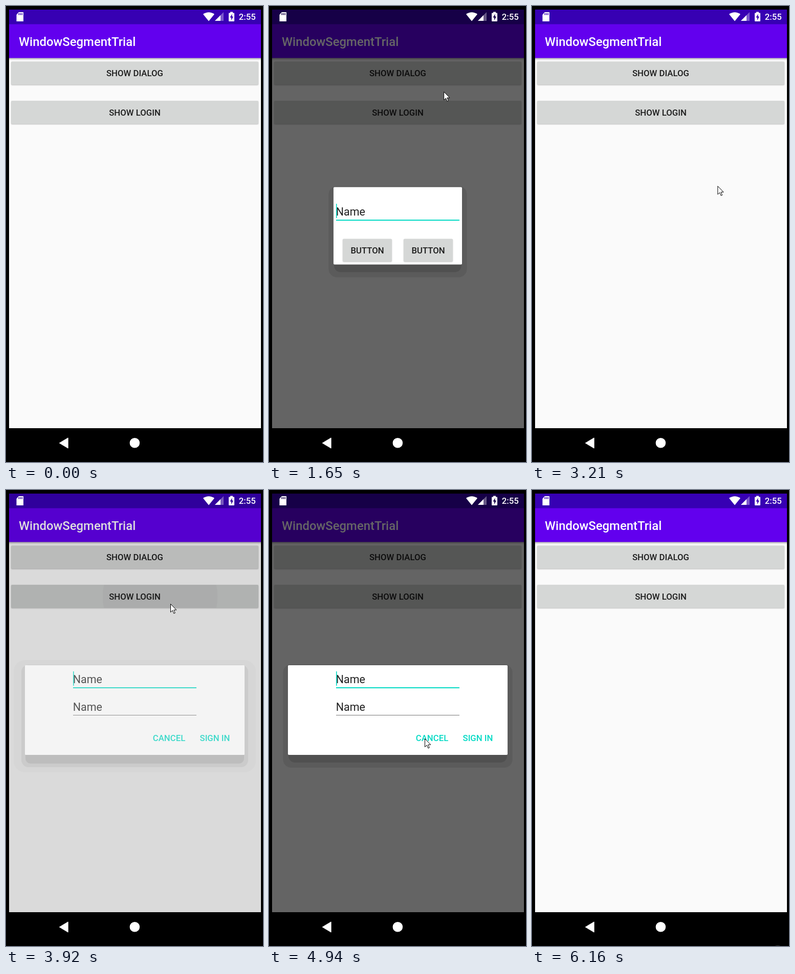
These frames come from a looping animation (502x890 px, 6.25 s). An HTML page with a canvas:

```html
<!DOCTYPE html>
<html lang="en">
<head>
<meta charset="utf-8">
<title>Dialog demo</title>
<style>
html, body { margin: 0; width: 100%; height: 100%; overflow: hidden; background: #000; }
canvas { display: block; }
</style>
</head>
<body>
<canvas id="stage" width="502" height="890"></canvas>
<script>
const LOOP = 6250, STEP = 78, PHASE = 12;
const TEAL = '#03dac5', INK = '#1c1c1c';
const stage = document.getElementById('stage').getContext('2d');
const layer = document.createElement('canvas').getContext('2d');
layer.canvas.width = 502;
layer.canvas.height = 890;

const dialogs = [
  { x: 126, y: 353.5, w: 251, h: 151, open: 1448, close: 2853, draw: drawNameDialog },
  { x: 37, y: 342, w: 429, h: 175, open: 3797, close: 5043, draw: drawLoginDialog }
];

// Each move is a curve: it bends towards (cx, cy) and stops at (x, y).
const START = { x: 414, y: 309 };
const MOVES = [
  { from: 550, to: 940, cx: 345, cy: 175, x: 303, y: 132 },
  { from: 1570, to: 1890, cx: 418, cy: 169, x: 223, y: 470 },
  { from: 1960, to: 2130, cx: 214, cy: 472, x: 206, y: 468 },
  { from: 2680, to: 3290, cx: 511, cy: 770, x: 321, y: 222 },
  { from: 3990, to: 4470, cx: 325, cy: 350, x: 304, y: 485 },
  { from: 5390, to: 5860, cx: 330, cy: 600, x: 450, y: 895 }
];

// Start time and centre of each click mark.
const CLICKS = [
  [70, 514.5, 859], [1170, 303, 132], [2520, 206, 468],
  [3610, 321, 222], [5020, 304, 485], [6090, 480, 904]
];

const clamp = v => Math.min(1, Math.max(0, v));
const within = (t, start, length) => t >= start && t < start + length;

function dialogAlpha(d, t) {
  return clamp((t - d.open) / 160) * clamp(1 - (t - d.close) / 155);
}

function dialogDim(d, t) {
  const rise = clamp((t - d.open - 50) / 140) ** 2;
  return .6 * rise * clamp(1 - (t - d.close - 60) / 200);
}

function cursorAt(t) {
  let p = START;
  for (const m of MOVES) {
    const u = clamp((t - m.from) / (m.to - m.from)), v = 1 - u;
    p = {
      x: v * v * p.x + 2 * u * v * m.cx + u * u * m.x,
      y: v * v * p.y + 2 * u * v * m.cy + u * u * m.y
    };
    if (u < 1) break;
  }
  return p;
}

function rect(c, color, x, y, w, h, r = 0) {
  c.fillStyle = color;
  c.beginPath();
  c.roundRect(x, y, w, h, r);
  c.fill();
}

function poly(c, color, points) {
  c.fillStyle = color;
  c.beginPath();
  points.forEach(([x, y]) => c.lineTo(x, y));
  c.closePath();
  c.fill();
}

function disc(c, color, x, y, r) {
  c.fillStyle = color;
  c.beginPath();
  c.arc(x, y, r, 0, Math.PI * 2);
  c.fill();
}

function text(c, str, x, y, size, color, weight = 500, align = 'left') {
  c.font = `${weight} ${size}px Roboto, sans-serif`;
  c.textAlign = align;
  c.fillStyle = color;
  c.fillText(str, x, y);
}

const label = (c, str, x, y, color) => text(c, str, x, y, 16.76, color, 500, 'center');

function button(c, str, x, y, w, h, decorate) {
  c.save();
  c.shadowColor = 'rgba(0,0,0,.25)';
  c.shadowBlur = 2;
  c.shadowOffsetY = 1;
  rect(c, '#d5d7d6', x, y, w, h, 2);
  c.restore();
  if (decorate) {
    c.save();
    c.clip();
    decorate();
    c.restore();
  }
  label(c, str, x + w / 2, y + h / 2 + 6.2, INK);
}

function wideButton(c, str, y, t, pressed, touchX) {
  const age = t - pressed;
  button(c, str, 10, y, 483, 45, within(t, pressed, 300) && (() => {
    rect(c, 'rgba(0,0,0,.05)', 10, y, 483, 45);
    disc(c, 'rgba(0,0,0,.03)', touchX - age * .09, y + 23, 30 + age * .37);
  }));
}

function drawApp(c, t) {
  rect(c, '#000', 0, 0, 502, 890);
  rect(c, '#fafafa', 6, 7, 492, 817);
  const shade = c.createLinearGradient(0, 101, 0, 106);
  shade.addColorStop(0, 'rgba(0,0,0,.32)');
  shade.addColorStop(1, 'rgba(0,0,0,0)');
  rect(c, shade, 6, 101, 492, 5);
  rect(c, '#6200ee', 6, 35, 492, 66.5);
  rect(c, '#3700b3', 6, 7, 492, 28.5);
  text(c, 'WindowSegmentTrial', 25, 78, 23.9, '#fff');
  wideButton(c, 'SHOW DIALOG', 108.5, t, 1330, 303);
  wideButton(c, 'SHOW LOGIN', 185, t, 3690, 321);
}

function drawStatus(c, dim) {
  const bar = `rgb(${55 * (1 - dim)},0,${179 * (1 - dim)})`;
  poly(c, '#fff', [[25, 12], [34, 12], [34, 30], [20.5, 30], [20.5, 17]]);
  for (let i = 0; i < 3; i++) rect(c, bar, 24.5 + i * 3, 14, 1.6, 3.5);

  c.fillStyle = '#fff';
  c.beginPath();
  c.moveTo(396, 29.5);
  c.lineTo(385, 16);
  c.quadraticCurveTo(396, 8.5, 407, 16);
  c.fill();

  poly(c, 'rgba(255,255,255,.35)', [[408, 29], [425, 12], [425, 29]]);
  poly(c, '#fff', [[408, 29], [419, 18], [419, 29]]);

  rect(c, '#fff', 435, 13.5, 11, 16.5, 1);
  rect(c, '#fff', 438, 11.5, 5, 3);
  poly(c, bar, [[441.5, 15.5], [437.5, 22.5], [440, 22.5], [440, 28], [444, 20.5], [441.5, 20.5]]);
  text(c, '2:55', 454.8, 27.2, 16.76, '#fff');
}

function drawNav(c) {
  poly(c, '#fff', [[103.5, 853], [121, 842.5], [121.7, 843], [121.7, 863], [121, 863.5]]);
  disc(c, '#fff', 251.4, 852.8, 9.8);
}

function field(c, base, active, caret) {
  text(c, 'Name', 130.7, base, 21.5, '#212121', 400);
  rect(c, active ? TEAL : '#777', 131, base + 8, 241, active ? 2 : 1);
  if (caret) rect(c, TEAL, 131, base - 23, 1.6, 28);
}

function drawNameDialog(c, caret) {
  field(c, 409, true, caret);
  button(c, 'BUTTON', 144, 454.5, 96, 44);
  button(c, 'BUTTON', 263, 454.5, 96, 44);
}

function drawLoginDialog(c, caret) {
  field(c, 377, true, caret);
  field(c, 431, false, false);
  label(c, 'CANCEL', 318.5, 489.7, TEAL);
  label(c, 'SIGN IN', 408, 489.7, TEAL);
}

function dialogShadow(c, { x, y, w, h }, alpha) {
  const band = (side, top, bottom, r, a) =>
    rect(c, `rgba(0,0,0,${a})`, x - side, y - top, w + side * 2, h + top + bottom, r);
  c.save();
  c.beginPath();
  c.rect(0, 0, 502, 890);
  c.rect(x, y, w, h);
  c.clip('evenodd');
  if (alpha < .5) {
    c.shadowColor = 'rgba(0,0,0,.07)';
    c.shadowBlur = 34;
    c.shadowOffsetY = 14;
    rect(c, '#fafafa', x, y, w, h, 2);
  } else if (alpha < 1) {
    band(22, 10, 34, 22, .02);
    band(7, 1, 24, 14, .05);
    band(-1, 0, 17, 10, .07);
  } else {
    band(9.5, 2, 25, 16, .09);
    band(-1, -6, 15, 13, .12);
  }
  c.restore();
}

function drawDialog(c, d, t) {
  const alpha = dialogAlpha(d, t);
  if (alpha <= 0) return;
  if (t < d.close) dialogShadow(c, d, alpha);
  layer.clearRect(0, 0, 502, 890);
  rect(layer, '#fff', d.x, d.y, d.w, d.h, 2);
  d.draw(layer, (Math.min(t, d.close) - d.open) % 1000 < 500);
  c.globalAlpha = alpha;
  c.drawImage(layer.canvas, 0, 0);
  c.globalAlpha = 1;
}

function drawPointer(c, { x, y }) {
  c.save();
  c.translate(x + .5, y + .5);
  poly(c, '#fff', [[0, 0], [0, 16], [3.8, 12.5], [6.4, 18.5], [8.8, 17.5], [6.3, 11.6], [11.3, 11.6]]);
  c.strokeStyle = '#000';
  c.lineWidth = 1;
  c.stroke();
  c.restore();
}

function render(t) {
  const c = stage;
  const dim = Math.max(...dialogs.map(d => dialogDim(d, t)));
  drawApp(c, t);
  rect(c, `rgba(0,0,0,${dim})`, 6, 7, 492, 817);
  drawStatus(c, dim);
  drawNav(c);
  dialogs.forEach(d => drawDialog(c, d, t));
  for (const [start, x, y] of CLICKS) {
    if (within(t, start, 150)) disc(c, 'rgba(130,130,130,.45)', x, y, 15);
  }
  if (within(t, 550, 5310)) drawPointer(c, cursorAt(t));
}

const begin = performance.now();
function tick() {
  const t = (performance.now() - begin) % LOOP;
  // The screen refreshes in even steps.
  render(Math.floor((t - PHASE) / STEP) * STEP + PHASE);
  requestAnimationFrame(tick);
}
tick();
</script>
</body>
</html>
```
